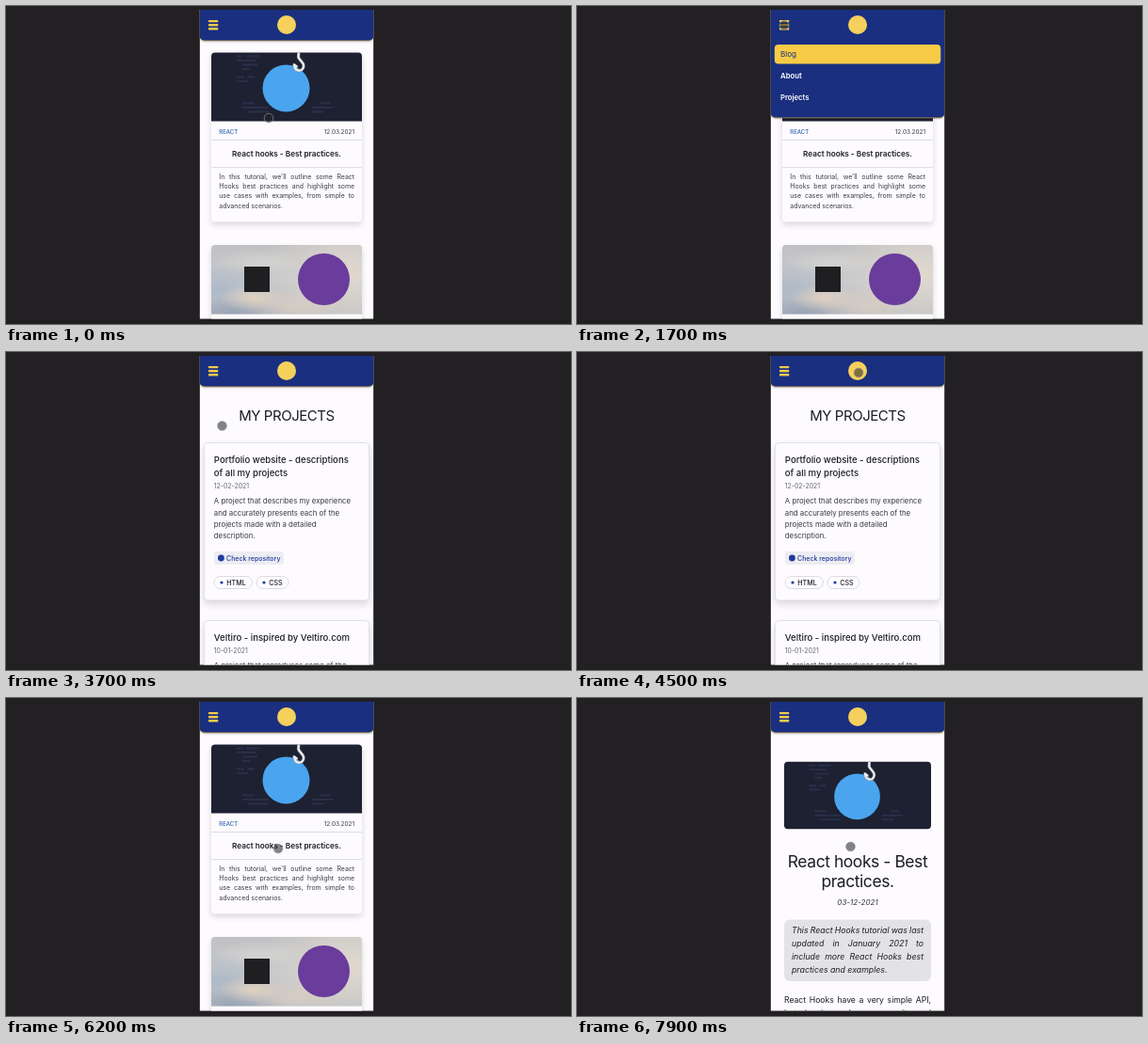
An HTML page with a canvas that plays this animation: 600 by 338 pixels, repeating every 8 s.

```html
<!DOCTYPE html>
<html lang="en">
<head>
<meta charset="utf-8">
<title>Mobile blog walkthrough</title>
<style>
  html, body { margin: 0; width: 100%; height: 100%; overflow: hidden; background: #222022; }
  canvas { display: block; width: 600px; height: 338px; }
</style>
</head>
<body>
<canvas id="stage"></canvas>
<script>
const LOOP = 8000;
const NAVY = '#1a2f80', YELLOW = '#f7cb45', INK = '#1d1d22', PAPER = '#fdfbfe';
const FONT = 'Inter, "Liberation Sans", sans-serif';
const LEFT = 205.6, WIDTH = 184.8;

const canvas = document.getElementById('stage');
const ctx = canvas.getContext('2d');
const dpr = window.devicePixelRatio || 1;
canvas.width = 600 * dpr;
canvas.height = 338 * dpr;

// time, x, y
const path = [
  [0, 279, 119], [800, 220, 20.5], [1750, 220, 20.5], [2450, 231, 96],
  [3200, 231, 96], [3700, 229.5, 78.5], [4450, 299, 22], [5250, 299, 22],
  [6050, 289, 160], [6900, 289, 160], [7500, 290.5, 158], [LOOP, 290.5, 158]
];

const clamp = v => Math.max(0, Math.min(1, v));
const ease = v => v * v * (3 - 2 * v);
const ramp = (t, from, to) => ease(clamp((t - from) / (to - from)));

function box(x, y, w, h, r, fill, stroke) {
  ctx.beginPath();
  ctx.roundRect(x, y, w, h, r);
  if (fill) { ctx.fillStyle = fill; ctx.fill(); }
  if (stroke) { ctx.strokeStyle = stroke; ctx.lineWidth = 0.7; ctx.stroke(); }
}

function dot(x, y, r, fill) {
  ctx.beginPath();
  ctx.arc(x, y, r, 0, Math.PI * 2);
  ctx.fillStyle = fill;
  ctx.fill();
}

function shadowed(blur, dy, alpha, draw) {
  ctx.save();
  ctx.shadowColor = `rgba(0,0,0,${alpha})`;
  ctx.shadowBlur = blur * dpr;
  ctx.shadowOffsetY = dy * dpr;
  draw();
  ctx.restore();
}

function text(str, x, y, size, { weight = 400, color = INK, align = 'left', style = '', track = 0 } = {}) {
  ctx.font = `${style} ${weight} ${size}px ${FONT}`;
  ctx.letterSpacing = track + 'px';
  ctx.textAlign = align;
  ctx.fillStyle = color;
  ctx.fillText(str, x, y);
  ctx.letterSpacing = '0px';
}

// Every line but the last fills the column.
function justified(lines, x, y, width, leading, size, opts = {}) {
  lines.forEach((line, i) => {
    const base = y + i * leading;
    if (i === lines.length - 1) return text(line, x, base, size, opts);
    const words = line.split(' ');
    ctx.font = `${opts.style || ''} 400 ${size}px ${FONT}`;
    const sizes = words.map(w => ctx.measureText(w).width);
    const gap = (width - sizes.reduce((a, b) => a + b, 0)) / (words.length - 1);
    let left = x;
    words.forEach((w, k) => {
      text(w, left, base, size, opts);
      left += sizes[k] + gap;
    });
  });
}

function rule(y) {
  ctx.fillStyle = '#d6d5da';
  ctx.fillRect(218, y, 160, 0.8);
}

// Dark cover with faint code lines, a disc and a fishing hook; 160 by 73 units.
function hookCover(x, y, scale, radii) {
  ctx.save();
  ctx.translate(x, y);
  ctx.scale(scale, scale);
  box(0, 0, 160, 73.2, radii, '#1d2132');
  ctx.clip();
  ctx.fillStyle = '#283049';
  for (const [lx, ly, lw] of [
    [27, 3, 7], [37, 3, 14], [27, 7.5, 20], [33, 12, 16], [33, 16.5, 8], [27, 25, 8], [38, 25, 8],
    [27, 29.5, 12], [33, 53, 13], [33, 57.5, 28], [39, 62, 22],
    [107, 57.5, 22], [107, 62, 12], [116, 53, 10]
  ]) ctx.fillRect(lx, ly, lw, 2);
  dot(79.5, 38, 25, '#4aa5ee');

  ctx.lineCap = ctx.lineJoin = 'round';
  for (const [color, width] of [['#8f969f', 3.2], ['#eef0f2', 2]]) {
    ctx.strokeStyle = color;
    ctx.lineWidth = width;
    ctx.beginPath();
    ctx.moveTo(93, -2);
    ctx.lineTo(92.5, 5);
    ctx.bezierCurveTo(94, 9, 99, 11, 98, 15);
    ctx.bezierCurveTo(97, 21, 88.5, 21, 88, 13);
    ctx.lineTo(90.5, 15);
    ctx.stroke();
  }
  ctx.restore();
}

// Soft flattened patch of cloud.
function cloud(x, y, r, flat, rgb, alpha) {
  ctx.save();
  ctx.translate(x, y);
  ctx.scale(1, flat);
  const glow = ctx.createRadialGradient(0, 0, 0, 0, 0, r);
  glow.addColorStop(0, `rgba(${rgb},${alpha})`);
  glow.addColorStop(1, `rgba(${rgb},0)`);
  dot(0, 0, r, glow);
  ctx.restore();
}

function skyCover() {
  ctx.save();
  box(218, 254, 160, 73.5, [4, 4, 0, 0]);
  ctx.clip();
  const sky = ctx.createLinearGradient(218, 254, 218, 328);
  sky.addColorStop(0, '#c0c1c3');
  sky.addColorStop(0.5, '#c6c8cb');
  sky.addColorStop(1, '#b9bcc2');
  ctx.fillStyle = sky;
  ctx.fillRect(218, 254, 160, 74);
  cloud(365, 285, 95, 0.8, '226,218,207', 0.9);
  cloud(228, 300, 48, 0.6, '160,178,199', 0.6);
  cloud(240, 326, 55, 0.3, '146,158,177', 0.8);
  cloud(262, 310, 36, 0.4, '228,210,191', 0.9);
  cloud(305, 318, 50, 0.35, '222,208,194', 0.7);
  cloud(270, 272, 55, 0.25, '222,220,216', 0.6);
  ctx.restore();
  ctx.fillStyle = '#1f1f22';
  ctx.fillRect(253, 277, 27, 27);
  dot(337.5, 290.5, 27.5, '#6a3c9c');
}

const blogCard = y => shadowed(6, 3, 0.15, () => box(218, y, 160, 180, 4, PAPER));

function blogPage() {
  blogCard(49.4);
  hookCover(218, 49.4, 1, [4, 4, 0, 0]);
  text('REACT', 226.3, 136, 6, { weight: 500, color: '#2f64b0' });
  text('12.03.2021', 370, 136, 6.4, { align: 'right', color: '#3a3a40' });
  rule(142);
  text('React hooks - Best practices.', 298, 159.8, 8.2, { weight: 600, align: 'center' });
  rule(171.3);
  justified([
    "In this tutorial, we'll outline some React",
    'Hooks best practices and highlight some',
    'use cases with examples, from simple to',
    'advanced scenarios.'
  ], 226.3, 183.6, 143.7, 10.35, 6.9, { color: '#3a3a40' });
  blogCard(254);
  skyCover();
}

function tag(x, width, label) {
  box(x, 238.5, width, 13, 6.5, PAPER, '#cfcfd5');
  dot(x + 8, 245, 1.6, '#2338a0');
  text(label, x + 13.3, 247.6, 7.1, { weight: 500 });
}

function card(y, height) {
  shadowed(8, 4, 0.15, () => box(210.4, y, 175.2, height, 4, PAPER));
  box(210.4, y, 175.2, height, 4, null, '#d6d6dc');
}

function projectsPage() {
  text('MY PROJECTS', 298, 72.6, 15, { align: 'center', track: -0.45 });
  card(96.5, 167.5);
  text('Portfolio website - descriptions', 220.8, 117.8, 9.58, { weight: 500 });
  text('of all my projects', 220.8, 132.2, 9.58, { weight: 500 });
  text('12-02-2021', 220.8, 145.2, 6.9, { color: '#66666e' });
  [
    'A project that describes my experience',
    'and accurately presents each of the',
    'projects made with a detailed',
    'description.'
  ].forEach((line, i) => text(line, 220.8, 161.2 + i * 12.4, 7.85, { color: '#3a3a42' }));
  box(220.8, 212, 74, 14, 3, '#ececf2');
  dot(228.4, 219, 3.4, '#1f3a9c');
  text('Check repository', 234, 221.5, 7, { weight: 500, color: '#1f3a9c' });
  tag(221, 40.5, 'HTML');
  tag(266, 34, 'CSS');
  card(285.5, 168);
  text('Veltiro - inspired by Veltiro.com', 220.8, 306.6, 9.58, { weight: 500 });
  text('10-01-2021', 220.8, 319.5, 6.9, { color: '#66666e' });
  text('A project that reproduces some of the', 220.8, 335.6, 7.85, { color: '#3a3a42' });
}

function articlePage() {
  hookCover(220, 67.8, 0.975, 4);
  text('React hooks - Best', 298, 180.2, 17.4, { align: 'center', track: -0.4 });
  text('practices.', 298, 200.6, 17.4, { align: 'center', track: -0.4 });
  text('03-12-2021', 298, 219.5, 8, { align: 'center', style: 'italic', color: '#34343a' });
  box(220, 235.5, 156, 65.5, 6, '#e3e3e5');
  justified([
    'This React Hooks tutorial was last',
    'updated in January 2021 to',
    'include more React Hooks best',
    'practices and examples.'
  ], 228, 250.4, 140, 13.9, 8.75, { style: 'italic' });
  justified([
    'React Hooks have a very simple API,',
    'but despite such a community and',
    ''
  ], 220, 324.2, 156, 13.6, 8.6);
}

function header(open) {
  const bottom = 37.3 + 82 * open;
  const corners = [0, 0, 5, 5];
  shadowed(2, 0.6, 0.25, () => box(LEFT, 4, WIDTH, bottom - 4, corners, '#b99b4c'));
  box(LEFT, 4, WIDTH, bottom - 4.9, corners, NAVY);
  if (open > 0) {
    ctx.save();
    ctx.beginPath();
    ctx.rect(LEFT, 37, WIDTH, Math.max(0, bottom - 38));
    ctx.clip();
    box(209.8, 41, 176.4, 20.5, 4, YELLOW);
    text('Blog', 216, 54.2, 8.1, { color: NAVY });
    text('About', 216, 77, 7.8, { weight: 600, color: '#fff' });
    text('Projects', 216, 99.6, 7.7, { weight: 600, color: '#fff' });
    ctx.restore();
  }
  for (let i = 0; i < 3; i++) box(214.9, 14.9 + i * 4.1, 10.4, 2.4, 0.8, '#f3ca4c');
  dot(298, 20, 10, '#f5d05c');
}

function cursor(t) {
  let i = 0;
  while (i < path.length - 2 && t >= path[i + 1][0]) i++;
  const [t0, x0, y0] = path[i], [t1, x1, y1] = path[i + 1];
  const k = ramp(t, t0, t1);
  dot(x0 + (x1 - x0) * k, y0 + (y1 - y0) * k, 4.8, 'rgba(36,36,38,0.56)');
  ctx.strokeStyle = 'rgba(138,138,140,0.85)';
  ctx.lineWidth = 0.9;
  ctx.stroke();
}

function pageAt(t) {
  if (t < 3000) return blogPage;
  if (t < 4900) return projectsPage;
  return t < 6700 ? blogPage : articlePage;
}

function draw(t) {
  ctx.setTransform(dpr, 0, 0, dpr, 0, 0);
  ctx.fillStyle = '#222022';
  ctx.fillRect(0, 0, 600, 338);
  ctx.save();
  ctx.beginPath();
  ctx.rect(LEFT, 4, WIDTH, 328.4);
  ctx.clip();
  ctx.fillStyle = PAPER;
  ctx.fillRect(LEFT, 4, WIDTH, 329);
  pageAt(t)();
  header(ramp(t, 1150, 1450) - ramp(t, 2950, 3250));
  cursor(t);
  ctx.restore();
}

const start = performance.now();
function tick() {
  draw((performance.now() - start) % LOOP);
  requestAnimationFrame(tick);
}
tick();
</script>
</body>
</html>
```
